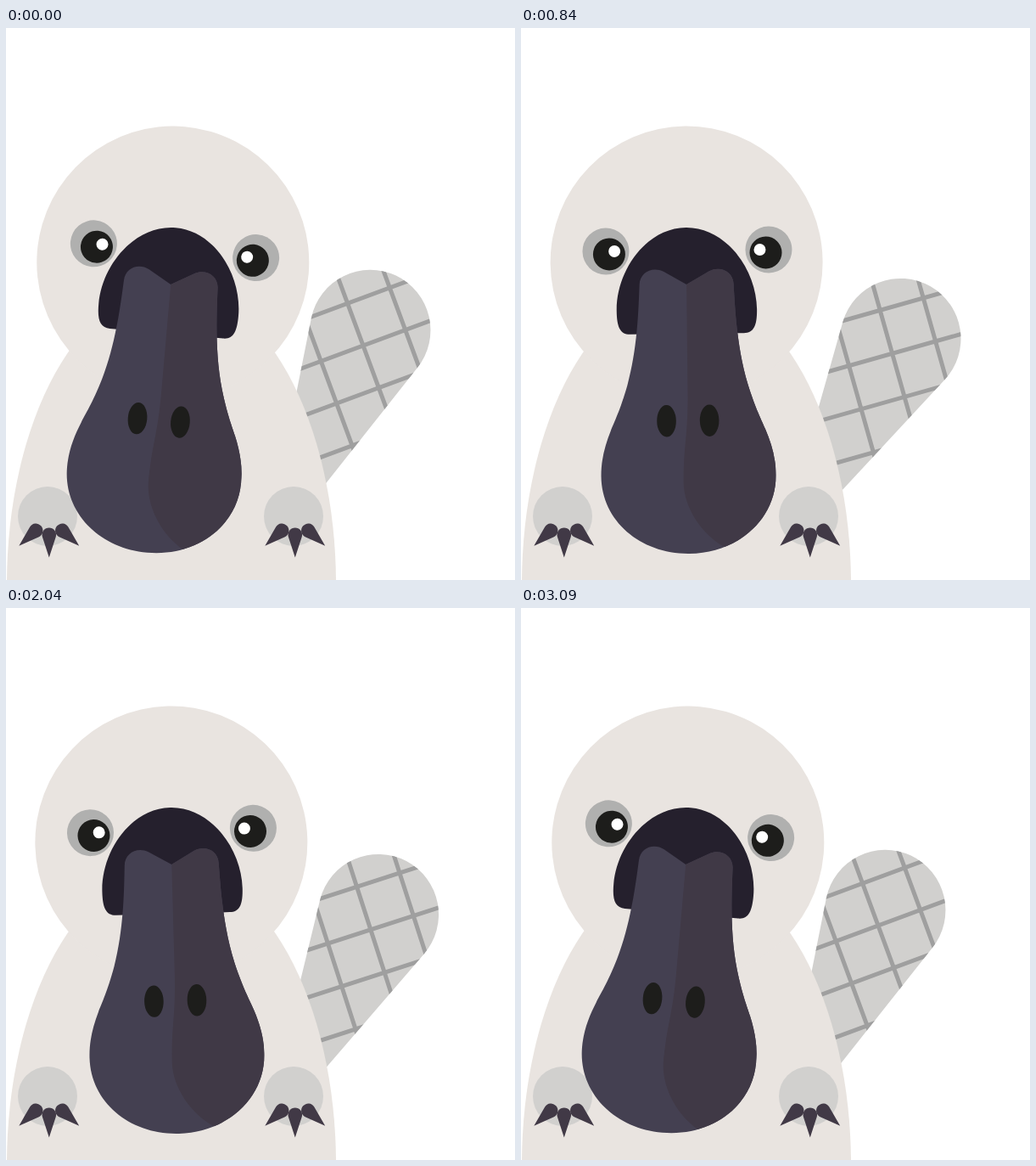
An HTML page that plays this animation: 600x650 px, repeating every 3120 ms.

```html
<!DOCTYPE html>
<html lang="en">
<head>
<meta charset="utf-8">
<title>Platypus</title>
<style>
  html, body { margin: 0; width: 100%; height: 100%; overflow: hidden; background: #fff; }
  svg { display: block; }
</style>
</head>
<body>
<svg width="600" height="650" viewBox="0 0 600 650">
  <defs>
    <path id="tailShape" d="M302 631L360 341A71 71 0 1 1 485 400Z"/>
    <path id="billShape" d="M195 302L222 286.500C235 280 250 287 250.500 302C252 335 254 378 266 420C275 450 282 463 286 473C293 490 298 507 298 527C298 580 252 619 195 619C138 619 92 580 92 527C92 507 97 490 104 473C108 463 115 450 124 420C136 378 138 335 139.500 302C140 287 155 280 168 286.500Z"/>
    <path id="claw" d="M-8 2A8.300 8.300 0 1 1 8 2L0 26.500Z"/>
    <clipPath id="tailClip"><use href="#tailShape"/></clipPath>
    <clipPath id="billClip"><use href="#billShape"/></clipPath>
    <g id="paw">
      <circle cx="49" cy="575" r="35" fill="#d1d0ce"/>
      <g fill="#413946">
        <use href="#claw" transform="translate(35 592) rotate(48)"/>
        <use href="#claw" transform="translate(50.800 597)"/>
        <use href="#claw" transform="translate(66.500 592) rotate(-48)"/>
      </g>
    </g>
  </defs>

  <g id="tail">
    <use href="#tailShape" fill="#d1d0ce"/>
    <g clip-path="url(#tailClip)">
      <path transform="translate(421 374) rotate(-20.300)" fill="none" stroke="#9f9f9f" stroke-width="5"
        d="M-200-53h400M-200 0h400M-200 53h400M-200 106h400M-53-200v450M0-200v450M53-200v450"/>
    </g>
  </g>

  <ellipse cx="195" cy="655" rx="194" ry="351" fill="#e9e4e0"/>
  <use href="#paw"/>
  <use href="#paw" x="290"/>

  <g id="head">
    <circle cx="195.300" cy="276" r="160.500" fill="#e9e4e0"/>
    <g fill="#b0b0af">
      <circle cx="100.300" cy="262" r="27.500"/>
      <circle cx="292.300" cy="262" r="27.500"/>
    </g>
    <g fill="#1d1d1b">
      <circle cx="104.200" cy="265.500" r="19"/>
      <circle cx="288.800" cy="265.500" r="19"/>
    </g>
    <g fill="#fff">
      <circle cx="110.500" cy="262" r="7"/>
      <circle cx="281.800" cy="262" r="7"/>
    </g>
    <path fill="#25202d" d="M112.300 332C112.300 285 148 235 195 235C242 235 277.700 285 277.700 332C277.700 351 274 360 262 360H128C116 360 112.300 351 112.300 332Z"/>
    <use href="#billShape" fill="#444051"/>
    <g clip-path="url(#billClip)">
      <path fill="#403946" d="M195 270V430C195 480 189 495 189 535C189 565 210 597 237 612L250 640H320V270Z"/>
    </g>
    <g fill="#1d1d1b">
      <ellipse cx="169.700" cy="462.500" rx="11.300" ry="18.700"/>
      <ellipse cx="220.300" cy="462.500" rx="11.300" ry="18.700"/>
    </g>
  </g>
</svg>
<script>
const LOOP = 3120, STEP = 30;
// [time in ms, angle in degrees]
const headKeys = [[0, 5], [1495, -5], [3090, 5], [LOOP, 5]];
const tailKeys = [[0, 0], [785, 4.85], [1620, 0], [2475, 4.85], [3090, 0], [LOOP, 0]];
const head = document.getElementById('head');
const tail = document.getElementById('tail');

function angleAt(keys, t) {
  const i = keys.findIndex(k => k[0] > t);
  const [t0, a0] = keys[i - 1], [t1, a1] = keys[i];
  return a0 + (a1 - a0) * (t - t0) / (t1 - t0);
}

function turn(part, angle, x, y) {
  part.setAttribute('transform', `rotate(${angle} ${x} ${y})`);
}

const start = performance.now();
function draw() {
  const t = Math.floor((performance.now() - start) % LOOP / STEP) * STEP;
  turn(head, angleAt(headKeys, t), 195, 293);
  turn(tail, angleAt(tailKeys, t), 311, 589);
  requestAnimationFrame(draw);
}
draw();
</script>
</body>
</html>
```
